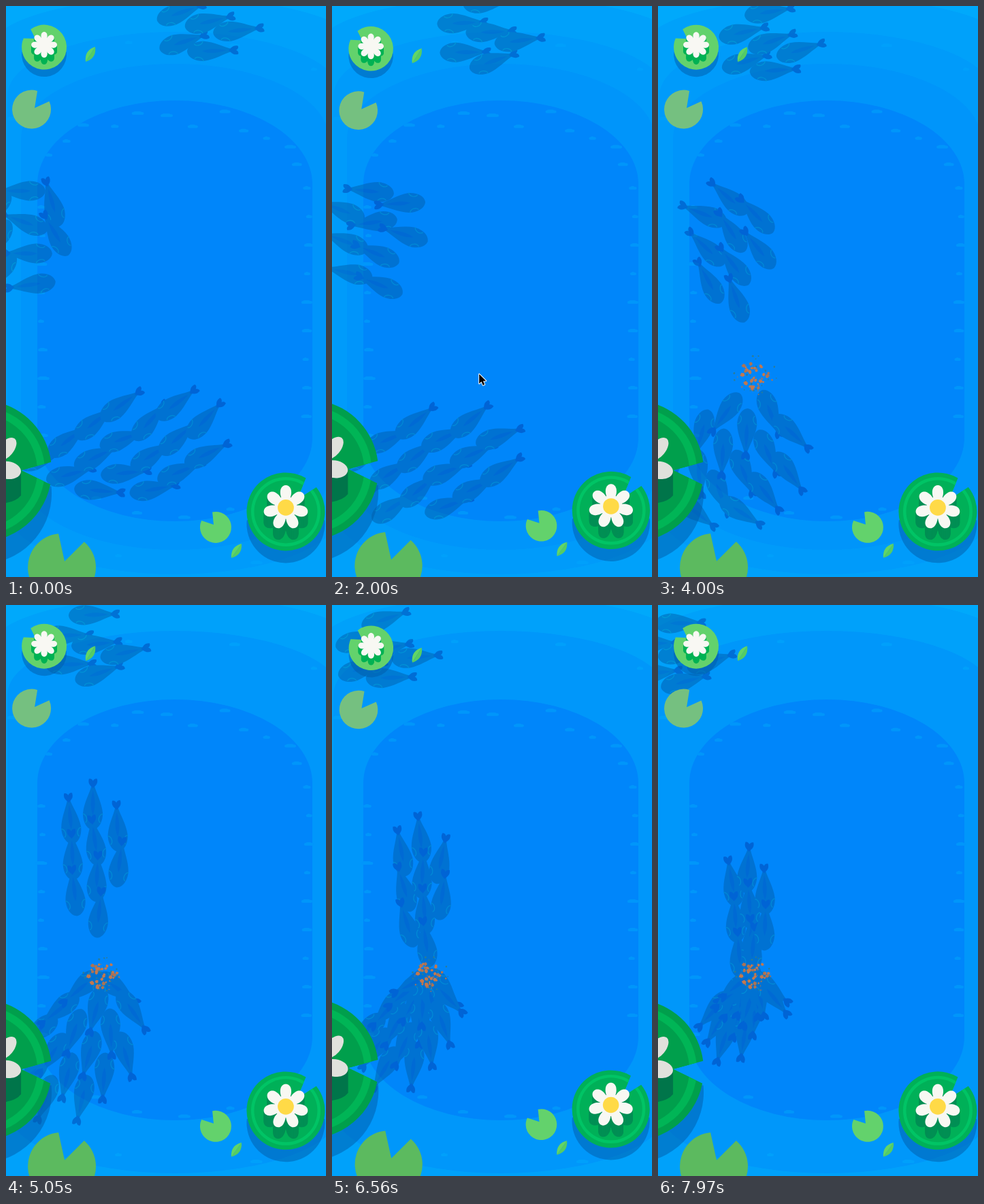
Recreate the animation shown at these times as an HTML page with a canvas. Size 470 px wide and 840 px high, loop 8000 ms.

```html
<!DOCTYPE html>
<html lang="en">
<head>
<meta charset="utf-8">
<title>Pond</title>
<style>
html, body { margin: 0; width: 100%; height: 100%; overflow: hidden; background: #0095fa; }
canvas { display: block; width: 470px; height: 840px; }
</style>
</head>
<body>
<canvas id="pond" width="470" height="840"></canvas>
<script>
const ctx = document.getElementById('pond').getContext('2d');
const layer = document.createElement('canvas');
layer.width = 470;
layer.height = 840;
const deep = layer.getContext('2d');

const TAU = Math.PI * 2;
const LOOP = 8000, STEP = 117.05, LEAD = 2.9;
const FOOD = { x: 141, y: 543, from: 3 };
const rad = deg => deg * Math.PI / 180;
const mix = (a, b, u) => a + (b - a) * u;
const clamp = v => Math.max(0, Math.min(1, v));
const smooth = v => { v = clamp(v); return v * v * (3 - 2 * v); };

function seeded(seed) {
  return () => (seed = (seed * 16807) % 2147483647) / 2147483647;
}

// Smooth path through points [time, x, y]; axis 1 is x, axis 2 is y.
function along(path, axis, t) {
  const last = path.length - 1;
  if (t >= path[last][0]) return path[last][axis];
  let i = 0;
  while (t > path[i + 1][0]) i++;
  const slope = j => {
    const a = path[Math.max(0, j - 1)], b = path[Math.min(last, j + 1)];
    return (b[axis] - a[axis]) / (b[0] - a[0]);
  };
  const d = path[i + 1][0] - path[i][0], u = (t - path[i][0]) / d, w = 1 - u;
  return path[i][axis] * w * w * (1 + 2 * u) + path[i + 1][axis] * u * u * (3 - 2 * u)
    + d * u * w * (slope(i) * w - slope(i + 1) * u);
}

// ---- water ----
const LAGOON = { x: 46, y: 139, w: 404, h: 619, ry: 123 };
const SHELF = { x: 2, y: 38, w: 492, h: 798, ry: 94 };

function basin({ x, y, w, h, ry }, color) {
  const rx = w / 2, cx = x + rx;
  ctx.beginPath();
  ctx.ellipse(cx, y + ry, rx, ry, 0, Math.PI, TAU);
  ctx.ellipse(cx, y + h - ry, rx, ry, 0, 0, Math.PI);
  ctx.fillStyle = color;
  ctx.fill();
}

function glints({ x, y, w, h, ry }, gap, depth, seed, color) {
  const rnd = seeded(seed), rx = w / 2, cx = x + rx;
  const glint = (gx, gy) => {
    const len = 9 + rnd() * 9;
    ctx.beginPath();
    ctx.roundRect(gx - len / 2, gy - 2, len, 4, 2);
    ctx.roundRect(gx - len / 2 + 2, gy - 3, len - 5, 5, 2.5);
    ctx.fill();
  };
  const arc = (cy, from, to, count) => {
    for (let i = 0; i < count; i++) {
      const a = mix(from, to, (i + 0.5) / count), inset = 4 + rnd() * depth;
      glint(cx + Math.cos(a) * (rx - inset), cy + Math.sin(a) * (ry - inset));
    }
  };
  ctx.fillStyle = color;
  arc(y + ry, Math.PI * 1.08, Math.PI * 1.95, Math.round(500 / gap));
  arc(y + h - ry, 0.6, 2.4, Math.round(220 / gap));
  for (let gy = y + ry + 6; gy < y + h - ry; gy += gap) {
    glint(x + w - 4 - rnd() * 6, gy);
    if (rnd() > 0.4) glint(x + 5 + rnd() * 4, gy + 28);
  }
}

function water(t) {
  const flat = t > 4.5;
  ctx.fillStyle = '#00a9fb';
  ctx.fillRect(0, 0, 470, 840);
  basin({ x: -22, y: -13, w: 540, h: 900, ry: 75 }, '#00a1fa');
  basin(SHELF, flat ? '#0097fa' : '#009bfa');
  if (!flat) basin({ x: 22, y: 85, w: 452, h: 715, ry: 110 }, '#0095fa');
  glints(SHELF, 120, 20, 31, '#00a0fb');
  basin(LAGOON, '#0086fa');
  glints(LAGOON, 42, 34, 77, '#0096fa');
}

// ---- fish ----
function fish(x, y, deg) {
  deep.save();
  deep.translate(x, y);
  deep.rotate(rad(deg));
  deep.fillStyle = '#0060ac';
  deep.beginPath();
  deep.moveTo(36, 0);
  deep.bezierCurveTo(35, -9, 24, -15, 11, -14.5);
  deep.bezierCurveTo(-4, -13, -18, -5, -29, -2);
  deep.lineTo(-29, 2);
  deep.bezierCurveTo(-18, 5, -4, 13, 11, 14.5);
  deep.bezierCurveTo(24, 15, 35, 9, 36, 0);
  deep.fill();

  deep.fillStyle = '#0044b2';
  deep.beginPath();
  deep.moveTo(-25, 0);
  deep.bezierCurveTo(-29, -3, -31, -8, -39, -6);
  deep.bezierCurveTo(-40, -3, -38, -1, -36, 0);
  deep.bezierCurveTo(-38, 1, -40, 3, -39, 6);
  deep.bezierCurveTo(-31, 8, -29, 3, -25, 0);
  deep.fill();

  deep.fillStyle = '#0050b0';
  deep.beginPath();
  deep.moveTo(14, 0);
  deep.quadraticCurveTo(0, -6, -22, 0);
  deep.quadraticCurveTo(0, 6, 14, 0);
  deep.fill();

  deep.strokeStyle = '#0092b4';
  deep.lineWidth = 1.2;
  for (const s of [-1, 1]) {
    deep.beginPath();
    deep.ellipse(19, s * 13, 6.5, 4, s * -0.3, s > 0 ? Math.PI : 0, s > 0 ? TAU : Math.PI);
    deep.stroke();
  }
  deep.restore();
}

// A school is a slanted grid that follows a path. Its grid vectors e1 and e2
// ease from the first pair to the second; spans hold [i, first j, last j].
const SCHOOLS = [
  {
    path: [[0, 294, -20], [4, 162, 9], [8, 30, 27]],
    e1: [[42, 13], [42, 13]], e2: [[4, 43], [4, 43]],
    spans: [[-1, 1, 2], [0, 0, 2], [1, 1, 1]],
    cruise: 170, swing: 9, fan: [0, 0], seed: 12
  },
  {
    path: [[0, 22, 272], [1.19, 37, 270], [2.82, 76, 276], [4, 104, 282], [5.05, 128, 295]],
    e1: [[46, 18], [36, 32]], e2: [[5, 46], [3, 53]],
    spans: [[-1, 1, 3], [0, 0, 3], [1, 0, 1]],
    cruise: 8, swing: 16, fan: [50, 0], seed: 9, hungry: true, beyond: 80
  },
  {
    path: [[0, 172, 637], [2.82, 108, 668], [4, 95, 657], [5.05, 100, 628]],
    e1: [[39, -26], [32, -32]], e2: [[42, 24], [22, 33]],
    spans: [[-2, -1, 1], [-1, -1, 2], [0, -1, 2], [1, -1, 2], [2, 0, 1]],
    cruise: 150, swing: 11, fan: [-9, 8], seed: 40, hungry: true, beyond: 0
  }
];
const HUNT = { from: 5.05, speed: 32 };

function swim(school, t) {
  const { path, e1, e2, spans, cruise, swing, fan, seed, hungry, beyond } = school;
  const rnd = seeded(seed * 7919);
  const tight = smooth((t - 2.8) / 2.2), settle = 1 - smooth(t / 1.6);
  const vec = (e, axis) => mix(e[0][axis], e[1][axis], tight);
  const x0 = along(path, 1, t), y0 = along(path, 2, t);

  for (const [i, first, last] of spans) {
    for (let j = first; j <= last; j++) {
      const phase = rnd() * TAU, room = 22 + rnd() * 24;
      let x = x0 + i * vec(e1, 0) + j * vec(e2, 0);
      let y = y0 + i * vec(e1, 1) + j * vec(e2, 1);
      let deg = cruise + (fan[0] * i + fan[1] * j) * settle;
      let sway = swing;
      if (hungry) {
        const goal = FOOD.y + beyond;
        const reach = Math.hypot(FOOD.x - x, goal - y);
        const go = Math.min(Math.max(0, t - HUNT.from) * HUNT.speed, Math.max(0, reach - room)) / reach;
        x = mix(x, FOOD.x, go);
        y = mix(y, goal, go);
        const dist = Math.hypot(x - FOOD.x, y - FOOD.y);
        if (dist < room && t > HUNT.from) y -= (room - dist) * Math.sign(beyond);

        const aim = Math.atan2(goal - y, FOOD.x - x) * 360 / TAU;
        const turn = smooth((t - 2.65 - dist / 300) / 1.2);
        deg += (((aim - deg) % 360 + 540) % 360 - 180) * turn;
        sway = mix(swing, 7, turn);
      }
      fish(x, y, deg + sway * Math.sin(1.9 * t + phase));
    }
  }
}

function shoals(t) {
  deep.clearRect(0, 0, 470, 840);
  for (const school of SCHOOLS) swim(school, t);
  ctx.globalAlpha = 0.5;
  ctx.drawImage(layer, 0, 0);
  ctx.globalAlpha = 1;
}

// ---- food ----
function food(t) {
  if (t < FOOD.from) return;
  const rnd = seeded(4211);
  const spread = 0.3 + 0.7 * smooth((t - FOOD.from) / 0.6) - 0.12 * smooth(t - 4);
  for (let i = 0; i < 70; i++) {
    const crumb = i < 38;
    const a = rnd() * TAU, r = Math.sqrt(rnd()) * (crumb ? 30 : 21) * spread;
    const size = crumb ? 0.8 + rnd() : 1.6 + rnd() * 2.2;
    const phase = rnd() * TAU;
    const x = FOOD.x + 1 + Math.cos(a) * r + 3 * Math.sin(t * 2 + phase);
    const y = FOOD.y + Math.sin(a) * r + 2 * Math.cos(t * 2.4 + phase);
    ctx.fillStyle = crumb ? (i % 3 ? '#2c7c96' : '#a0755c') : (i % 4 ? '#c2784e' : '#ab7355');
    ctx.beginPath();
    for (let k = 0; k < 5; k++) {
      const b = phase + k * TAU / 5, q = size * (0.75 + 0.35 * ((i + k * 3) % 4) / 3);
      ctx.lineTo(x + Math.cos(b) * q, y + Math.sin(b) * q);
    }
    ctx.fill();
  }
}

// ---- plants ----
const PADS = {
  west: {
    x: -37, y: 684, r: 104, drop: 33, color: '#009f4c',
    rings: [[94, '#00b556'], [83, '#009f4c']], cut: [[66, 671], [22, 683], [66, 704]]
  },
  east: {
    x: 411, y: 744, r: 57.5, drop: 18, color: '#00b058',
    rings: [[51, '#00c465'], [46.5, '#00b058']], cut: [[441, 694], [427, 727], [457, 707]]
  },
  north: { x: 56, y: 60.5, r: 33, drop: 10.5, color: '#63d26c', cut: [[25, 47], [43, 48], [36, 34]] },
  olive: { x: 37.5, y: 152, r: 28.5, color: '#75c080', cut: [[46, 125], [42, 150], [64, 140]] },
  south: { x: 82, y: 826, r: 50, color: '#5cba5f', cut: [[77, 776], [86, 817], [115, 788]] },
  small: { x: 308, y: 767, r: 23, color: '#63d26c', cut: [[287, 757], [305, 763], [303, 744]] }
};

function disc(x, y, r, color) {
  ctx.beginPath();
  ctx.arc(x, y, r, 0, TAU);
  ctx.fillStyle = color;
  ctx.fill();
}

function pad({ x, y, r, drop, color, rings = [], cut }) {
  const angle = ([px, py]) => Math.atan2(py - y, px - x);
  if (drop) {
    ctx.beginPath();
    ctx.arc(x, y + drop, r, -0.1, Math.PI + 0.1);
    ctx.fillStyle = 'rgba(0,92,170,.5)';
    ctx.fill();
  }
  ctx.save();
  ctx.beginPath();
  ctx.arc(x, y, r, angle(cut[2]), angle(cut[0]) + TAU);
  ctx.lineTo(...cut[1]);
  ctx.closePath();
  ctx.fillStyle = color;
  ctx.fill();
  ctx.clip();
  for (const [size, tint] of rings) disc(x, y, size, tint);
  ctx.restore();
}

function petals(x, y, r, count, color) {
  disc(x, y, r * 0.5, color);
  for (let i = 0; i < count; i++) {
    ctx.save();
    ctx.translate(x, y);
    ctx.rotate(i * TAU / count - TAU / 4);
    ctx.beginPath();
    ctx.moveTo(0, 0);
    ctx.bezierCurveTo(r * 0.4, -r * 0.2, r * 0.55, -r * 0.27, r * 0.76, -r * 0.24);
    ctx.bezierCurveTo(r * 1.08, -r * 0.19, r * 1.08, r * 0.19, r * 0.76, r * 0.24);
    ctx.bezierCurveTo(r * 0.55, r * 0.27, r * 0.4, r * 0.2, 0, 0);
    ctx.fill();
    ctx.restore();
  }
}

function flower(x, y, r, count, depth, shade, heart) {
  for (let d = depth; d > 0; d--) petals(x, y + d, r, count, shade);
  petals(x, y, r, count, '#f8f8f3');
  disc(x, y, r * 0.36, heart);
}

function leaf(x1, y1, x2, y2) {
  const mx = (x1 + x2) / 2, my = (y1 + y2) / 2;
  const nx = (y2 - y1) * 0.42, ny = (x1 - x2) * 0.42;
  const half = (side, color) => {
    ctx.beginPath();
    ctx.moveTo(x1, y1);
    ctx.quadraticCurveTo(mx + nx * side, my + ny * side, x2, y2);
    ctx.fillStyle = color;
    ctx.fill();
  };
  half(1, '#63d566');
  half(-1, '#56cc62');
}

function ellipse(x, y, rx, ry, deg, color) {
  ctx.beginPath();
  ctx.ellipse(x, y, rx, ry, rad(deg), 0, TAU);
  ctx.fillStyle = color;
  ctx.fill();
}

function plants(t) {
  const zoom = 1.001 - 0.0044 * (1 - Math.cos((t - 0.5) / 4 * TAU));
  ctx.save();
  ctx.translate(235, 420);
  ctx.scale(zoom, zoom);
  ctx.translate(-235, -420);

  pad(PADS.north);
  flower(56, 57, 19, 8, 10, '#00b254', '#f8f8f3');
  pad(PADS.olive);
  leaf(117, 82, 131, 60);

  pad(PADS.west);
  ctx.fillStyle = '#00754a';
  ctx.beginPath();
  ctx.moveTo(-6, 684);
  ctx.lineTo(22, 684);
  ctx.lineTo(22, 720);
  ctx.quadraticCurveTo(14, 730, -6, 732);
  ctx.fill();
  ellipse(0, 652, 20, 11, -50, '#e0e1dc');
  ellipse(2, 683, 20, 13, 8, '#e0e1dc');

  pad(PADS.south);
  pad(PADS.small);
  leaf(331, 812, 346, 791);
  pad(PADS.east);
  flower(411, 738, 33, 7, 17, '#008f54', '#ffda47');
  ctx.restore();
}

// ---- pointer ----
function pointer(t) {
  if (t < 0.8 || t > 3.4) return;
  const u = smooth((t - 1.2) / 1.4);
  if (t > 2.65 && t < 3.05) {
    ctx.beginPath();
    ctx.arc(142.5, 544, 9.5, 0, TAU);
    ctx.strokeStyle = '#0b2038';
    ctx.lineWidth = 2.6;
    ctx.stroke();
    ctx.strokeStyle = '#fff';
    ctx.lineWidth = 1.3;
    ctx.stroke();
  }
  ctx.save();
  ctx.translate(mix(327, 141, u), mix(538.5, 543.5, u));
  ctx.beginPath();
  for (const [px, py] of [[0, 0], [0, 14], [3.2, 11], [5.6, 16.4], [8, 15.3], [5.8, 10.2], [10, 10]]) {
    ctx.lineTo(px, py);
  }
  ctx.closePath();
  ctx.lineJoin = 'round';
  ctx.lineWidth = 2;
  ctx.strokeStyle = '#fff';
  ctx.stroke();
  ctx.fillStyle = '#000';
  ctx.fill();
  ctx.restore();
}

function draw() {
  const ms = performance.now() % LOOP;
  const t = Math.max(0, Math.floor((ms - LEAD) / STEP)) * STEP / 1000;
  water(t);
  shoals(t);
  food(t);
  plants(t);
  pointer(t);
  requestAnimationFrame(draw);
}
draw();
</script>
</body>
</html>
```
